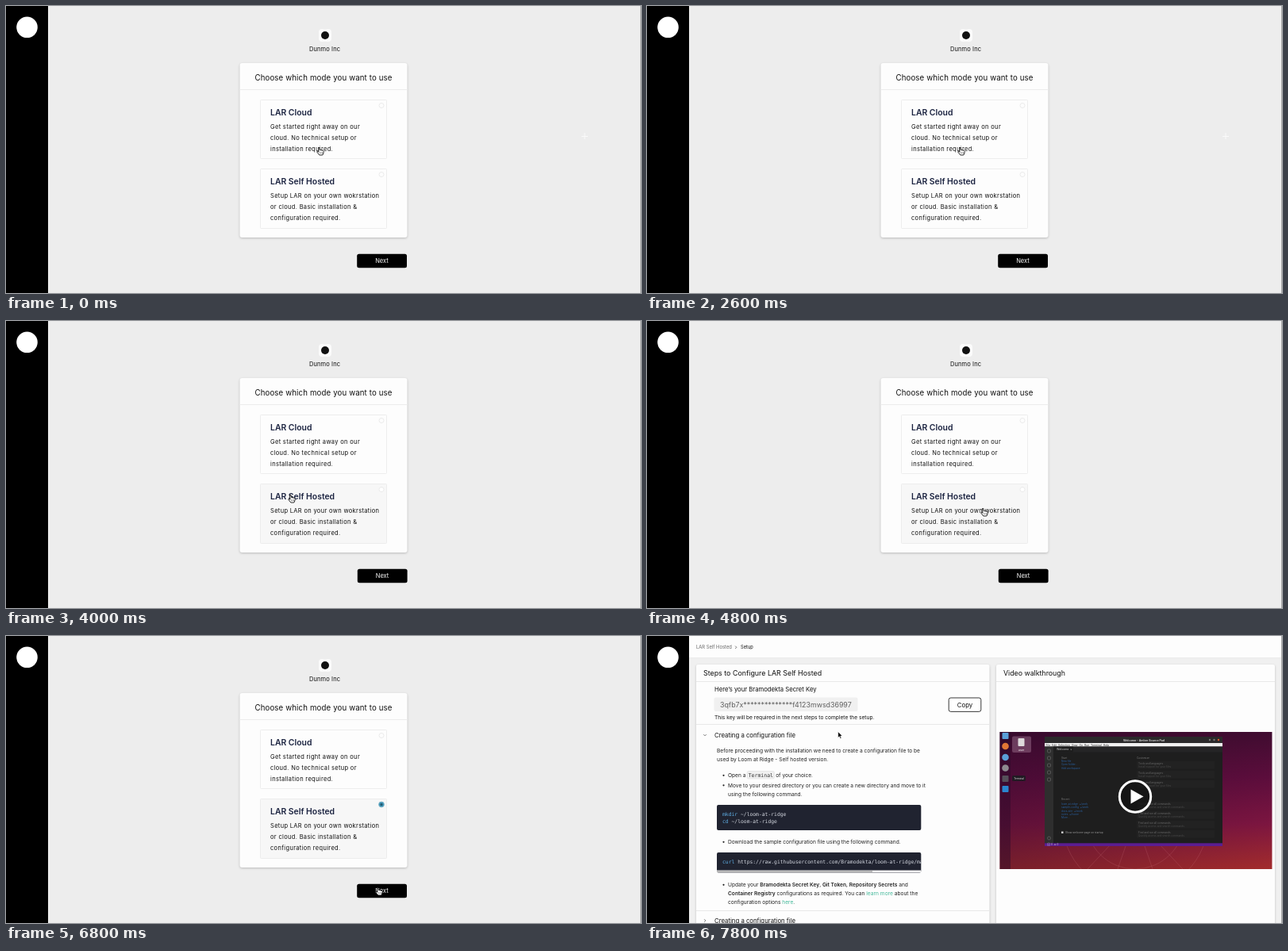
Animation of 800 by 362 pixels, one loop 8000 ms. Source, as an HTML page with a canvas:

```html
<!DOCTYPE html>
<html lang="en">
<head>
<meta charset="utf-8">
<title>Setup walkthrough</title>
<style>
  html, body { margin: 0; width: 100%; height: 100%; overflow: hidden; background: #ededed; }
  canvas { display: block; width: 800px; height: 362px; }
</style>
</head>
<body>
<canvas id="stage" width="800" height="362"></canvas>
<script>
const ctx = document.getElementById('stage').getContext('2d');
const LOOP = 8000, STEP = 200, CLICK = 5400, SETUP = 7000;
const SANS = 'Inter, sans-serif', MONO = '"DejaVu Sans Mono", monospace';

// Pointer stops: time, x, y
const STOPS = [
  [0, 396, 183], [2800, 396, 183], [3800, 360, 224], [4000, 360, 224], [4800, 425, 241],
  [6000, 425, 241], [6600, 470, 322], [7200, 470, 322], [7800, 241, 125], [LOOP, 241, 125]
];

function pointerAt(t) {
  const i = STOPS.findIndex(stop => stop[0] > t);
  const [t0, x0, y0] = STOPS[i - 1], [t1, x1, y1] = STOPS[i];
  const p = (t - t0) / (t1 - t0), e = p * p * (3 - 2 * p);
  return { x: x0 + (x1 - x0) * e, y: y0 + (y1 - y0) * e };
}

function rect(x, y, w, h, fill) {
  ctx.fillStyle = fill;
  ctx.fillRect(x, y, w, h);
}

function paint(fill, stroke, width = 1) {
  if (fill) { ctx.fillStyle = fill; ctx.fill(); }
  if (stroke) { ctx.strokeStyle = stroke; ctx.lineWidth = width; ctx.stroke(); }
}

function box(x, y, w, h, r, fill, stroke, width) {
  ctx.beginPath();
  ctx.roundRect(x, y, w, h, r);
  paint(fill, stroke, width);
}

function disc(x, y, r, fill, stroke, width) {
  ctx.beginPath();
  ctx.arc(x, y, r, 0, Math.PI * 2);
  paint(fill, stroke, width);
}

function poly(points, fill, stroke, width, close = true) {
  ctx.beginPath();
  points.forEach(([x, y]) => ctx.lineTo(x, y));
  if (close) ctx.closePath();
  paint(fill, stroke, width);
}

// Draws text and returns the x where it ends
function text(str, x, y, size, { color = '#111', weight = 400, family = SANS, spacing = 0, align = 'left' } = {}) {
  ctx.font = `${weight} ${size}px ${family}`;
  ctx.letterSpacing = spacing + 'px';
  ctx.textAlign = align;
  ctx.fillStyle = color;
  ctx.fillText(str, x, y);
  return x + ctx.measureText(str).width;
}

function panel(x, y, w, h, r) {
  ctx.save();
  ctx.shadowColor = 'rgba(0,0,0,.22)';
  ctx.shadowBlur = 3;
  ctx.shadowOffsetY = 1;
  box(x, y, w, h, r, '#fdfdfd');
  ctx.restore();
}

function rail() {
  rect(0, 0, 53, 362, '#000');
  disc(26.5, 26.8, 13.3, '#fff');
}

function option(y, h, title, lines, active, checked) {
  box(320.5, y + 0.5, 159, h, 1, active ? '#f7f7f7' : '#fdfdfd', '#ededed');
  text(title, 333, y + 19.5, 10.4, { weight: 600, color: '#1b2340' });
  lines.forEach((line, i) => text(line, 333, y + 36.6 + i * 14.4, 7.5, { spacing: 0.33 }));
  const cy = y + 7.5;
  if (checked) {
    disc(473, cy, 3.4, '#3d93b5', '#83b6ca', 0.8);
    disc(473, cy, 1.5, '#24566c');
  } else {
    disc(473, cy, 3, active ? '#fff' : '#fdfdfd', '#e6e6e6', 0.8);
  }
}

function modePage(t, pointer) {
  const checked = t >= CLICK;
  const hover = pointer.y > 205 && pointer.y < 280;
  rect(53, 0, 747, 362, '#ededed');
  rect(799, 0, 1, 362, '#a8a8a8');
  if (!hover && !checked) {
    rect(725, 164, 8, 1, '#fafafa');
    rect(728.5, 160, 1, 8, '#fafafa');
  }

  box(394, 29, 16, 16, 4, '#fbfbfb');
  disc(402, 37, 5, '#111');
  text('Dunmo Inc', 401.5, 57, 7.5, { align: 'center', spacing: 0.1 });

  panel(294.5, 72, 211, 220, 3);
  text('Choose which mode you want to use', 400, 94, 9.7, { align: 'center', spacing: 0.12 });
  rect(294.5, 105, 211, 1, '#ececec');
  option(118, 74, 'LAR Cloud', [
    'Get started right away on our',
    'cloud. No technical setup or',
    'installation required.'
  ], false, false);
  option(205, 75, 'LAR Self Hosted', [
    'Setup LAR on your own wokrstation',
    'or cloud. Basic installation &',
    'configuration required.'
  ], hover || checked, checked);

  const shift = hover && !checked ? 0.6 : 0;
  box(442.2 + shift, 312.7, 62.8, 17.6, 2.5, '#000');
  text('Next', 473.4 + shift, 324.3, 7.5, { color: '#fff', align: 'center' });
}

function chevron(x, y, down) {
  const s = 1.7;
  poly(down ? [[x - s, y - s / 2], [x, y + s / 2], [x + s, y - s / 2]]
            : [[x - s / 2, y - s], [x + s / 2, y], [x - s / 2, y + s]], null, '#555', 0.8, false);
}

const plain = str => ({ str });
const bold = str => ({ str, weight: 600 });
const link = str => ({ str, color: '#43b99a' });

// Draws styled runs one after another
function prose(x, y, ...runs) {
  for (const { str, color = '#222', weight } of runs) x = text(str, x, y, 6.61, { color, weight });
  return x;
}

const bullet = y => disc(96.5, y - 2.2, 1.1, '#222');

function command(y, name, rest) {
  const x = text(name, 95, y, 6.37, { family: MONO, color: '#5fb0e6' });
  text(rest, x, y, 6.37, { family: MONO, color: '#d4d8e0' });
}

function steps() {
  panel(62, 36, 369.5, 340, 2);
  text('Steps to Configure LAR Self Hosted', 71, 50, 8.9);
  rect(62, 57, 369.5, 1, '#e8e8e8');
  text('Here’s your Bramodekta Secret Key', 85, 69.5, 7.7);
  box(84.5, 77.5, 181, 17.5, 2, '#f0f0f0');
  text('3qfb7x**************f4123mwsd36997', 92, 89.7, 8.83, { color: '#606060' });
  box(380.2, 78, 40.6, 17.4, 2.5, '#fff', '#222', 0.9);
  text('Copy', 400.5, 89.6, 7.8, { align: 'center' });
  text('This key will be required in the next steps to complete the setup.', 85, 104.5, 6.63);
  rect(62, 111, 369.5, 1, '#e8e8e8');

  chevron(73, 125, true);
  text('Creating a configuration file', 85, 127.6, 7.78);
  prose(88, 147, plain('Before proceeding with the installation we need to create a configuration file to be'));
  prose(88, 158, plain('used by Loom at Ridge - Self hosted version.'));

  bullet(178);
  const x = prose(102, 178, plain('Open a '));
  box(x, 170.5, 34, 9.5, 1.5, '#f0f0f0', '#dedede', 0.6);
  text('Terminal', x + 1.4, 177.8, 6.5, { family: MONO, color: '#333' });
  prose(x + 34, 178, plain(' of your choice.'));
  bullet(190.5);
  prose(102, 190.5, plain('Move to your desired directory or you can create a new directory and move to it'));
  prose(102, 201.5, plain('using the following command.'));

  box(88, 213, 257.3, 32, 2, '#202330');
  command(227, 'mkdir', ' ~/loom-at-ridge');
  command(236.3, 'cd', ' ~/loom-at-ridge');
  bullet(262);
  prose(102, 262, plain('Download the sample configuration file using the following command.'));

  ctx.save();
  box(88, 273, 257.3, 25.5, 2, '#202330');
  ctx.clip();
  command(287, 'curl', ' https://raw.githubusercontent.com/Bramodekta/loom-at-ridge/main/');
  rect(88, 295.5, 258, 3, '#f1f1f1');
  rect(88, 296, 196, 2.2, '#b9b9b9');
  ctx.restore();

  bullet(316);
  prose(102, 316, plain('Update your '), bold('Bramodekta Secret Key'), plain(', '), bold('Git Token'), plain(', '),
    bold('Repository Secrets'), plain(' and'));
  prose(102, 326.7, bold('Container Registry'), plain(' configurations as required. You can '), link('learn more'),
    plain(' about the'));
  prose(102, 337.5, plain('configuration options '), link('here'), plain('.'));
  rect(62, 346, 369.5, 1, '#e8e8e8');
  chevron(73, 359, false);
  text('Creating a configuration file', 85, 361.8, 7.78);
}

function editor() {
  rect(501, 127, 224, 138, '#1e1e1e');
  rect(501, 127, 224, 8, '#2b2a2b');
  text('Welcome - Amber Source Pad', 626, 132.7, 3.6, { color: '#ddd', weight: 600, align: 'center' });
  for (const i of [0, 1, 2]) disc(709 + i * 5.5, 131, 1.2, i === 2 ? '#d9542b' : '#777');
  rect(501, 135, 224, 4.5, '#f1f1f1');
  text('File  Edit  Selection  View  Go  Run  Terminal  Help', 502.5, 138.6, 3.4, { color: '#333' });
  rect(501, 139.5, 11, 122, '#2e2e2e');
  for (let i = 0; i < 5; i++) box(504.5, 143 + i * 9, 4, 4, 1, null, '#666', 0.7);
  disc(506.5, 255, 2, null, '#666', 0.7);
  rect(512, 139.5, 213, 7, '#252526');
  rect(512, 139.5, 25, 7, '#1e1e1e');
  text('Welcome  ×', 516, 144.4, 3.5, { color: '#ccc' });
  rect(501, 261.3, 224, 3.7, '#5b1d91');
  text('⊗ 0  △ 0', 504, 264.4, 3, { color: '#ddd' });

  const label = (str, x, y, color = '#777') => text(str, x, y, 3.2, { color });
  const links = (y, ...names) => names.forEach((name, i) => label(name, 522, y + i * 4.3, '#2a5f9e'));
  label('Start', 522, 154.5);
  links(159, 'New file', 'Open folder...', 'Add workspace');
  label('Recent', 522, 207);
  links(213, 'loom-at-ridge  ~/work', 'sample-config  ~/work', 'docs-site  ~/work', 'notes  ~/home', 'More...');
  const cards = (y, count, title, note) => {
    for (let i = 0; i < count; i++) {
      rect(617, y + i * 12, 98, 9.5, '#222');
      label(title, 619, y + 4 + i * 12, '#686868');
      label(note, 619, y + 8 + i * 12, '#484848');
    }
  };
  label('Customize', 617, 154.5);
  cards(158, 3, 'Tools and languages', 'Install support for your files');
  label('Learn', 617, 206);
  cards(209, 4, 'Find and run all commands', 'Quickly access and search commands');
  rect(522, 246.5, 2.5, 2.5, '#ccc');
  label('Show welcome page on startup', 527, 249, '#999');
}

function wash(x0, y0, x1, y1, ...colors) {
  const gradient = ctx.createLinearGradient(x0, y0, x1, y1);
  colors.forEach((color, i) => gradient.addColorStop(i / (colors.length - 1), color));
  rect(444, 121, 344, 173, gradient);
}

function video() {
  ctx.save();
  ctx.beginPath();
  ctx.rect(444.5, 121, 343, 173);
  ctx.clip();
  wash(0, 121, 0, 294, '#400c30', '#5c0d3c', '#7c1540', '#a32c2c');
  wash(444, 0, 788, 0, 'rgba(40,8,40,.35)', 'rgba(40,8,40,0)');
  ctx.globalAlpha = 0.3;
  for (const r of [62, 92]) disc(615, 232, r, null, '#d07a80', 0.7);
  for (const dx of [-60, -22, 22, 60]) poly([[615 + dx * 0.5, 262], [615 + dx, 294]], null, '#d07a80', 0.7, false);
  ctx.globalAlpha = 1;

  rect(444, 121, 14, 173, 'rgba(40,10,40,.45)');
  box(447.5, 122, 8, 8, 1, '#5a9fd8');
  disc(451.5, 139, 4.3, '#e07735');
  disc(451.5, 153, 4.3, '#5a9fd8');
  disc(451.5, 166.5, 4.3, '#8d8a90');
  box(447.5, 176, 8, 8, 1, '#55505a');
  box(447.5, 189, 8, 8, 1, '#2b86cf');
  box(460, 126.5, 24, 20.5, 2, 'rgba(205,165,190,.32)');
  box(467.5, 129, 8, 10, 1, '#dedbdc');
  text('user', 471.5, 145, 3.4, { color: '#fff', align: 'center' });
  box(460, 176, 17, 7, 1.5, '#211a23');
  text('Terminal', 468.5, 180.7, 3.1, { color: '#ddd', align: 'center' });
  editor();
  ctx.restore();

  disc(615, 202.5, 19.7, 'rgba(20,20,20,.85)', '#fff', 3);
  poly([[609.5, 193.5], [609.5, 211.5], [625.5, 202.5]], '#fff');
}

function setupPage() {
  rect(53, 0, 747, 362, '#f0f0f0');
  rect(53, 0, 747, 27.5, '#fdfdfd');
  rect(53, 27.5, 747, 0.7, '#e5e5e5');
  text('LAR Self Hosted', 62, 16.3, 5.85, { color: '#666' });
  chevron(112, 14.3, false);
  text('Setup', 118, 16.3, 5.75);
  steps();
  panel(440, 36, 351, 340, 2);
  text('Video walkthrough', 449, 50, 8.8);
  rect(440, 57, 351, 1, '#e8e8e8');
  video();
  rect(799, 0, 1, 362, '#a8a8a8');
}

function hand({ x, y }) {
  ctx.save();
  ctx.translate(x, y);
  ctx.lineJoin = 'round';
  poly([[-2.5, -4.5], [-1.2, -4.5], [-0.6, -1.5], [3.3, -0.8], [4.3, 0.4], [3.8, 3], [2.8, 5],
    [-1.2, 5], [-4.2, 1.2], [-3.8, 0.2], [-2, 1.2]], '#fff', '#111', 0.9);
  for (const dx of [0, 1.5, 3]) poly([[dx - 0.4, 1.2], [dx - 0.4, 3.3]], null, '#333', 0.5, false);
  ctx.restore();
}

function arrow({ x, y }) {
  ctx.save();
  ctx.translate(x - 0.3, y - 4.2);
  poly([[0, 0], [0, 7.4], [1.7, 5.9], [2.9, 8.6], [4.2, 8], [3, 5.4], [5.3, 5.3]], '#000', '#fff', 0.6);
  ctx.restore();
}

function draw(now) {
  const t = Math.floor((now % LOOP) / STEP) * STEP;
  const pointer = pointerAt(t);
  rail();
  if (t < SETUP) {
    modePage(t, pointer);
    hand(pointer);
  } else {
    setupPage();
    arrow(pointer);
  }
  requestAnimationFrame(draw);
}
requestAnimationFrame(draw);
</script>
</body>
</html>
```
